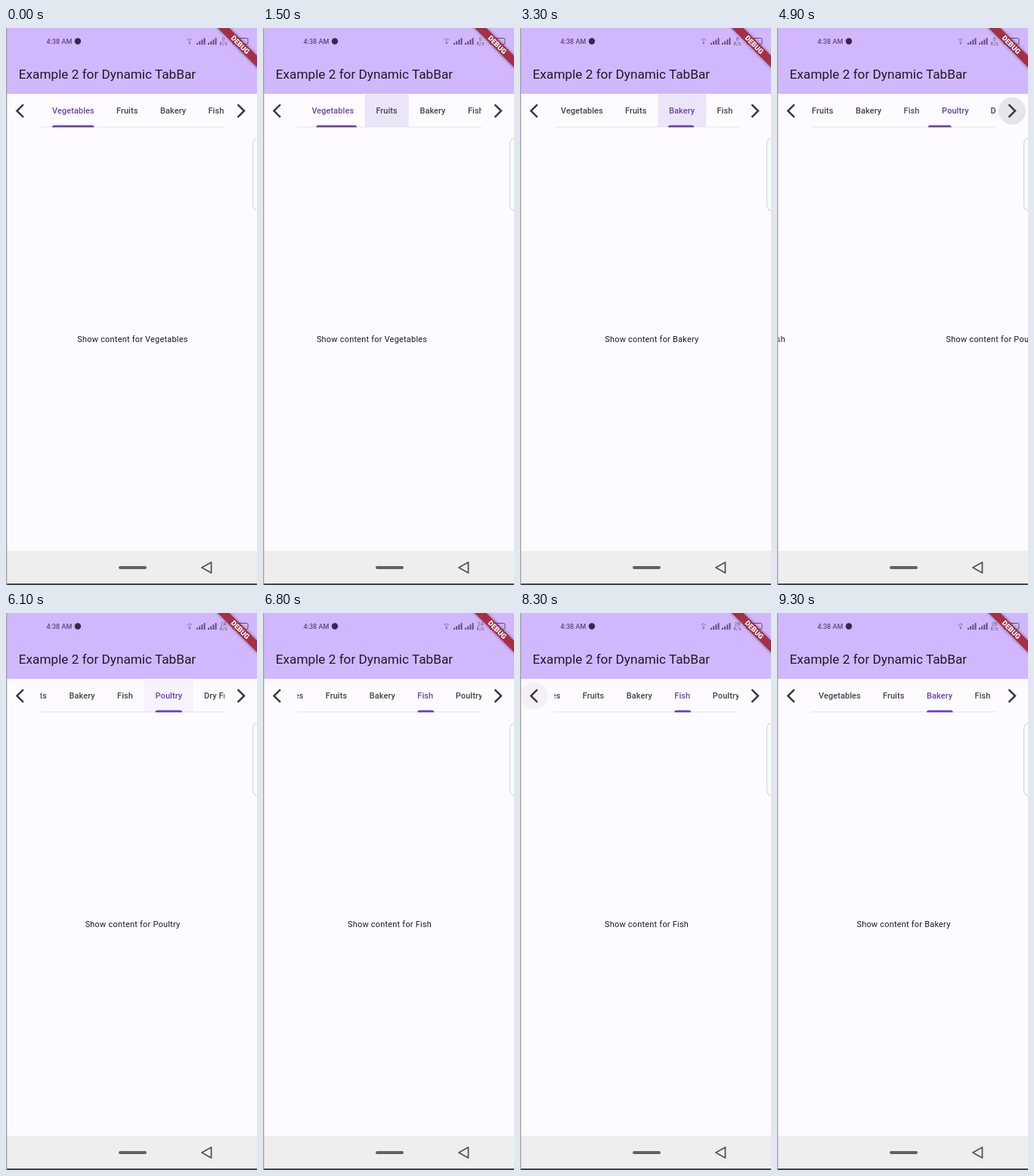
Animation, 332 px wide and 736 px high, one loop 9.9 s. Source, as an HTML page:

```html
<!DOCTYPE html>
<html lang="en">
<head>
<meta charset="utf-8">
<title>Dynamic TabBar</title>
<style>
  html, body { margin: 0; width: 100%; height: 100%; overflow: hidden; background: #fdfbff; }
  svg { display: block; width: 100vw; height: 100vh; font-family: Roboto, sans-serif; }
  .tab { font-size: 10.95px; font-weight: 500; letter-spacing: .09px; }
  .page { font-size: 10.95px; letter-spacing: .23px; fill: #1d1b20; text-anchor: middle; }
  .speed { font-size: 6.5px; text-anchor: middle; fill: #67587f; }
  .chevron { fill: none; stroke: #3d3942; stroke-width: 2.5; }
</style>
</head>
<body>
<svg viewBox="0 0 332 736">
  <defs>
    <clipPath id="strip"><rect x="45.5" y="87" width="243.5" height="46"/></clipPath>
    <clipPath id="body"><rect x="1.5" y="133" width="331" height="557"/></clipPath>
    <filter id="soft" x="-20%" y="-80%" width="140%" height="260%"><feGaussianBlur stdDeviation="2"/></filter>
  </defs>
  <rect width="332" height="736" fill="#fdfbff"/>
  <rect width="332" height="87" fill="#d1b8fe"/>
  <text x="16.8" y="67" font-size="17.2" fill="#1d1b20">Example 2 for Dynamic TabBar</text>

  <g id="status" fill="#5d4c79">
    <text x="53.5" y="21" font-size="9" font-weight="500">4:38 AM</text>
    <circle cx="95" cy="17.5" r="4.2" fill="#372a4c"/>
    <path d="M239.5 15.5q3.2-2.6 6.4 0M241 17.6q1.7-1.3 3.4 0" fill="none" stroke="#806da0" stroke-width=".9"/>
    <path d="M241.3 19.2h3l-1.5 2.4z"/>
    <text id="speed" class="speed" x="287.5" y="17"></text>
    <text class="speed" x="287.5" y="23">K/s</text>
    <rect x="300" y="13.5" width="20" height="8" rx="1.5" fill="none" stroke="#5d4c79"/>
    <rect x="302" y="15" width="9" height="5"/>
  </g>

  <g clip-path="url(#strip)">
    <rect x="45" y="130.3" width="244" height="1" fill="#e6e1e9"/>
    <rect id="ink" y="87.5" height="43" fill="#6d40c8"/>
    <g id="tabs"></g>
    <path id="indicator" fill="#6a43b3"/>
  </g>
  <circle id="press" cy="109.5" r="18" fill="#49454f"/>
  <path class="chevron" d="M23 101.2L14.5 109.5L23 117.8M306.5 101.2L315 109.5L306.5 117.8"/>

  <g id="pages" clip-path="url(#body)"></g>
  <rect x="326.5" y="145.5" width="20" height="96" rx="7" fill="#fbfafc" stroke="#dddbe0" stroke-width="1.3"/>

  <rect y="691" width="332" height="43" fill="#efeeef"/>
  <rect x="149" y="711" width="37" height="4" rx="2" fill="#626164"/>
  <path d="M271.5 706v14l-12.5-7z" fill="none" stroke="#545356" stroke-width="1.8" stroke-linejoin="round"/>
  <rect y="734" width="332" height="2" fill="#454447"/>
  <rect width="1.4" height="736" fill="#a5a2aa"/>

  <g transform="translate(332 0) rotate(45)">
    <rect x="-45" y="25.8" width="90" height="11" fill="#000" opacity=".4" filter="url(#soft)"/>
    <rect x="-45" y="25.8" width="90" height="11" fill="#a82a3f" opacity=".93"/>
    <text y="34.6" font-size="9.4" font-weight="800" fill="#fff" text-anchor="middle">DEBUG</text>
  </g>
</svg>
<script>
const LOOP = 9900, STEP = 100, PAGE = 331;
const TABS = [
  ['Vegetables', 0, 55.5], ['Fruits', 85, 28.5], ['Bakery', 143, 34.5],
  ['Fish', 206.5, 22], ['Poultry', 257, 35.5], ['Dry Fruits', 321.5, 53]
].map(([name, x, w]) => ({ name, x, w }));

// start, duration, tab, optional dragged strip position
const MOVES = [
  [1475, 300, 1], [2260, 330, 1, 5], [3035, 325, 2], [4062, 238, 3],
  [4807, 250, 4], [5150, 250, 5], [5745, 300, 4], [6445, 300, 3],
  [7200, 270, 4], [7870, 250, 3], [8850, 250, 2]
];
// start, last full step, end, tab
const TAPS = [
  [1500, 1600, 1800, 1], [3000, 3300, 3700, 2], [5700, 5900, 6400, 4],
  [6400, 6600, 6800, 3], [7200, 7400, 7900, 4], [8900, 9000, 9300, 2]
];
// start, last full step, end, centre x
const PRESSES = [[4100, 4300, 4500, 311], [4900, 5200, 5400, 311], [7900, 8200, 8400, 18.5]];
const SPEEDS = [[0, '0'], [3000, '6'], [5300, '24'], [7900, '28']];

const $ = id => document.getElementById(id);
const mix = (a, b, p) => a + (b - a) * p;
const clamp = (v, lo, hi) => Math.max(lo, Math.min(hi, v));

function add(parent, tag, attrs, text = '') {
  const el = document.createElementNS('http://www.w3.org/2000/svg', tag);
  set(el, attrs);
  el.textContent = text;
  return parent.appendChild(el);
}
function set(el, attrs) {
  for (const key in attrs) el.setAttribute(key, attrs[key]);
}

// cubic-bezier(.25, .1, .25, 1)
function ease(x) {
  if (x <= 0 || x >= 1) return clamp(x, 0, 1);
  const bez = (a, b, s) => 3 * a * s * (1 - s) ** 2 + 3 * b * s * s * (1 - s) + s ** 3;
  let lo = 0, hi = 1;
  for (let i = 0; i < 24; i++) {
    const mid = (lo + hi) / 2;
    if (bez(.25, .25, mid) < x) lo = mid; else hi = mid;
  }
  return bez(.1, 1, lo);
}

const restLeft = i => clamp(215.3 - TABS[i].x - TABS[i].w / 2, -100.5, 109);

function poseAt(t) {
  let page = 0, left = 61;
  for (const [start, length, tab, dragged] of MOVES) {
    const p = ease((t - start) / length);
    page = mix(page, tab, p);
    left = mix(left, dragged ?? restLeft(tab), p);
  }
  return { page, left };
}

function strength(list, t, full, faint) {
  const hit = list.find(([start, , end]) => t >= start && t < end);
  return hit ? { at: hit[3], alpha: t <= hit[1] ? full : faint } : { at: 0, alpha: 0 };
}

const tabEls = TABS.map(tab => add($('tabs'), 'text', { class: 'tab', y: 112.7 }, tab.name));
const pageEls = TABS.map(tab => add($('pages'), 'text', { class: 'page', y: 415.3 }, 'Show content for ' + tab.name));
for (const x of [252, 267]) {
  for (let i = 0; i < 4; i++) {
    const h = 2.5 + i * 2.1;
    add($('status'), 'rect', { x: x + i * 3.2, y: 22 - h, width: 1.9, height: h });
  }
}

function draw(t) {
  const { page, left } = poseAt(t);
  TABS.forEach((tab, i) => {
    const on = clamp(1 - Math.abs(page - i), 0, 1);
    const rgb = [[70, 106], [66, 67], [76, 179]].map(([a, b]) => Math.round(mix(a, b, on)));
    set(tabEls[i], { x: left + tab.x, fill: `rgb(${rgb})` });
    set(pageEls[i], { x: 167.5 + (i - page) * PAGE });
  });

  const from = TABS[Math.floor(page)], to = TABS[Math.ceil(page)], p = page % 1;
  const x = left + mix(from.x, to.x, p), w = mix(from.w, to.w, p);
  set($('indicator'), { d: `M${x} 131.3v-.2q0-2.6 2.6-2.6h${w - 5.2}q2.6 0 2.6 2.6v.2z` });

  const tap = strength(TAPS, t, .12, .045), tapped = TABS[tap.at];
  set($('ink'), { x: left + tapped.x - 14.7, width: tapped.w + 29.4, opacity: tap.alpha });
  const press = strength(PRESSES, t, .12, .05);
  set($('press'), { cx: press.at, opacity: press.alpha });
  $('speed').textContent = SPEEDS.filter(([start]) => t >= start).pop()[1];
}

const begin = performance.now();
function tick() {
  const t = (performance.now() - begin) % LOOP;
  draw(Math.floor(t / STEP) * STEP);
  requestAnimationFrame(tick);
}
tick();
</script>
</body>
</html>
```
